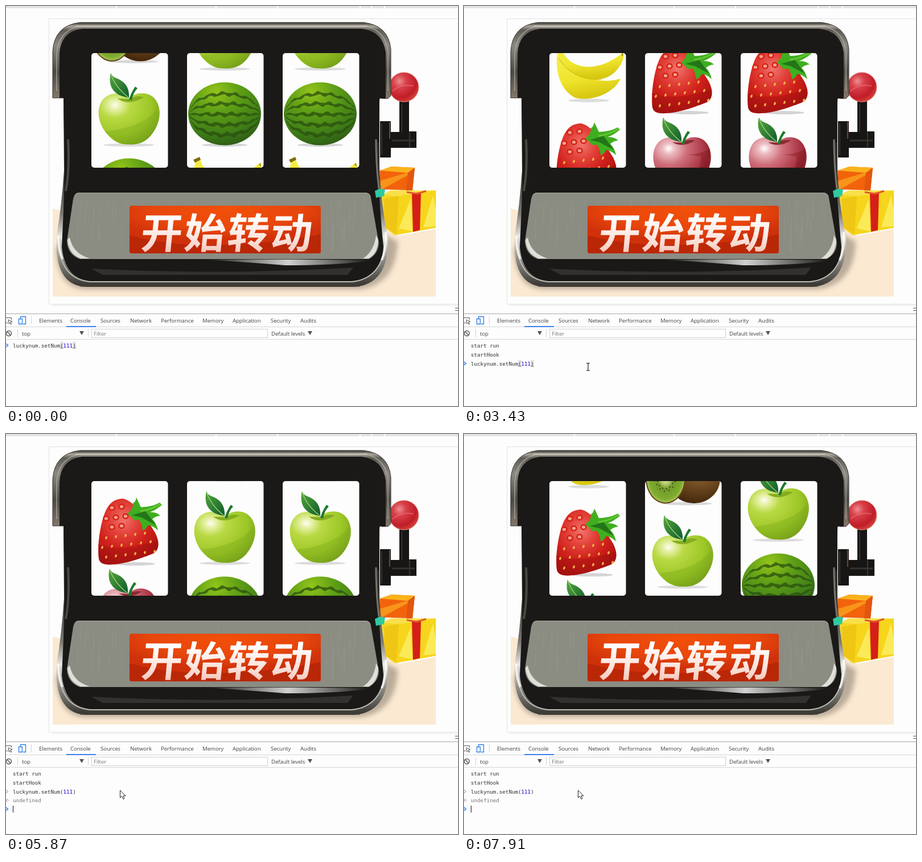
These frames come from a looping animation (794x705 px, 8 s). An HTML page:

```html
<!DOCTYPE html>
<html lang="zh">
<head>
<meta charset="utf-8">
<title>Slot machine</title>
<style>
html, body { margin: 0; width: 100%; height: 100%; overflow: hidden; background: #fdfdfd; }
svg { display: block; }
.ui { font: 9.7px "Open Sans", "Noto Sans", sans-serif; letter-spacing: -.1px; fill: #444; }
.mono { font: 9.2px "DejaVu Sans Mono", monospace; fill: #303030; white-space: pre; }
.num { fill: #1c00cf; }
.start { font: bold 73px "Noto Sans CJK SC", "Noto Sans CJK", sans-serif; letter-spacing: 3px; }
</style>
</head>
<body>
<svg id="stage" width="794" height="705" viewBox="0 0 794 705">
<defs>
  <linearGradient id="shell" x1="0" y1="0" x2="0" y2="1">
    <stop offset="0" stop-color="#3a3732"/><stop offset=".05" stop-color="#aaa69c"/>
    <stop offset=".1" stop-color="#5f5c55"/><stop offset=".3" stop-color="#8a8880"/>
    <stop offset=".65" stop-color="#4b4943"/><stop offset="1" stop-color="#85786b"/>
  </linearGradient>
  <linearGradient id="rim" x1="0" y1="0" x2="0" y2="1">
    <stop offset="0" stop-color="#2a2926"/><stop offset=".4" stop-color="#34332f"/>
    <stop offset=".62" stop-color="#7b7972"/><stop offset=".74" stop-color="#e9e8e3"/>
    <stop offset=".86" stop-color="#8d8b84"/><stop offset="1" stop-color="#35332f"/>
  </linearGradient>
  <linearGradient id="gloss">
    <stop offset="0" stop-color="#fff" stop-opacity="0"/><stop offset=".5" stop-color="#fff"/>
    <stop offset="1" stop-color="#fff" stop-opacity="0"/>
  </linearGradient>
  <radialGradient id="button" cx=".5" cy=".1" r=".62">
    <stop offset="0" stop-color="#f24f0a"/><stop offset=".62" stop-color="#e8470c"/>
    <stop offset="1" stop-color="#cf310a"/>
  </radialGradient>
  <linearGradient id="label" x1="0" y1="0" x2="0" y2="1">
    <stop offset=".3" stop-color="#fff"/><stop offset=".65" stop-color="#fbe3dc"/>
    <stop offset="1" stop-color="#f0b8a8"/>
  </linearGradient>
  <radialGradient id="green" cx=".27" cy=".23" r=".85">
    <stop offset="0" stop-color="#fdfdf0"/><stop offset=".12" stop-color="#e3efa0"/>
    <stop offset=".3" stop-color="#b9d944"/><stop offset=".7" stop-color="#9cc626"/>
    <stop offset="1" stop-color="#759f1a"/>
  </radialGradient>
  <radialGradient id="red" cx=".27" cy=".22" r=".88">
    <stop offset="0" stop-color="#fff"/><stop offset=".12" stop-color="#ecbcc2"/>
    <stop offset=".36" stop-color="#cf6f7b"/><stop offset=".66" stop-color="#b03c4a"/>
    <stop offset="1" stop-color="#76101a"/>
  </radialGradient>
  <radialGradient id="melon" cx=".38" cy=".15" r=".9">
    <stop offset="0" stop-color="#93c41a"/><stop offset=".35" stop-color="#5f9f16"/>
    <stop offset=".75" stop-color="#3f7d17"/><stop offset="1" stop-color="#2b5714"/>
  </radialGradient>
  <radialGradient id="berry" cx=".42" cy=".32" r=".75">
    <stop offset="0" stop-color="#f0766f"/><stop offset=".3" stop-color="#e2423a"/>
    <stop offset=".6" stop-color="#cf1f1a"/><stop offset="1" stop-color="#a81210"/>
  </radialGradient>
  <linearGradient id="banana" x1="0" y1="0" x2=".25" y2="1">
    <stop offset="0" stop-color="#f6ef50"/><stop offset=".6" stop-color="#efe42c"/>
    <stop offset="1" stop-color="#d8c812"/>
  </linearGradient>
  <radialGradient id="husk" cx=".6" cy=".2" r=".8">
    <stop offset="0" stop-color="#a37b43"/><stop offset=".5" stop-color="#765024"/>
    <stop offset="1" stop-color="#44280c"/>
  </radialGradient>
  <radialGradient id="pulp">
    <stop offset="0" stop-color="#dfe4a8"/><stop offset=".25" stop-color="#b4c96a"/>
    <stop offset=".42" stop-color="#6f9a2a"/><stop offset=".85" stop-color="#7fab2e"/>
    <stop offset="1" stop-color="#a3c452"/>
  </radialGradient>
  <radialGradient id="ball" cx=".35" cy=".3" r=".75">
    <stop offset="0" stop-color="#ec8d90"/><stop offset=".3" stop-color="#d8404a"/>
    <stop offset=".75" stop-color="#c01d28"/><stop offset="1" stop-color="#d4453c"/>
  </radialGradient>
  <linearGradient id="leafFill" x2="1" y2="1">
    <stop offset="0" stop-color="#55a83c"/><stop offset="1" stop-color="#0f5c2c"/>
  </linearGradient>
  <filter id="soft"><feGaussianBlur stdDeviation="4"/></filter>

  <g id="leaf">
    <path d="M34 1C31 14 32 27 43 36C50 42 59 43 66 45C67 30 62 20 50 13C42 9 36 8 34 1Z" fill="url(#leafFill)"/>
    <path d="M35 5Q43 27 65 44" fill="none" stroke="#a4d27a" stroke-width="1.3"/>
    <path d="M66 48Q70 35 77 25L81 28Q73 36 71 49Z" fill="#1f7a2a"/>
  </g>
  <path id="appleBody" d="M66 46C78 33 104 33 114 50C125 68 120 93 104 112C92 126 76 128 66 127C52 128 38 122 26 107C11 88 8 64 20 48C31 34 55 34 66 46Z"/>
  <g id="f0">
    <ellipse cx="66" cy="128" rx="45" ry="2.8" fill="#dcdcdc"/>
    <use href="#appleBody" fill="url(#green)"/>
    <path d="M46 46Q65 60 92 44Q80 39 67 47Z" fill="#84ad20"/>
    <path d="M116 64C100 88 62 100 24 104Q38 122 66 127C102 128 121 91 116 64Z" fill="#7aa51c" opacity=".35"/>
    <use href="#leaf"/>
  </g>
  <g id="f1">
    <ellipse cx="66" cy="128" rx="40" ry="3" fill="#d6d6d6"/>
    <ellipse cx="66" cy="73" rx="64" ry="55.5" fill="url(#melon)"/>
    <g id="stripes" fill="#2a4f10" opacity=".75"/>
  </g>
  <g id="f2">
    <ellipse cx="69" cy="109.500" rx="36" ry="3" fill="#dcdcdc"/>
    <path d="M13 29C11 62 20 92 46 105C76 112 114 96 125 71C102 78 64 80 27 35Z" fill="url(#banana)"/>
    <path d="M12 20L22 15L26 28C42 56 88 60 129 25Q132 33 127 43C119 58 108 69 90 72C56 74 30 58 17 36Z" fill="url(#banana)"/>
    <path d="M17 36C30 58 56 75 92 72" fill="none" stroke="#cfbf14" stroke-width="1.200"/>
    <path d="M11 20L22 15L24 20L14 25Z" fill="#7d6c14"/>
    <path d="M126 29L129 25L130 32Z" fill="#a8981a"/>
  </g>
  <g id="f3">
    <ellipse cx="76" cy="131" rx="36" ry="3" fill="#d4d4d4"/>
    <path d="M13 122C10 100 15 62 24 40C30 24 42 15 56 16C76 20 100 56 112 76C120 92 120 107 108 113C92 119 62 131 36 132C22 133 15 130 13 122Z" fill="url(#berry)"/>
    <path d="M12 96C45 110 88 100 117 88C120 106 112 112 92 119C72 126 50 132 36 132C22 133 15 130 13 122Z" fill="#8d0a0a" opacity=".3"/>
    <g id="seeds"/>
    <path d="M63 42Q74 35 73 24Q77 23 79 14L87 31Q105 31 120 23L124 27Q112 37 102 40Q114 39 121 46Q112 47 107 52Q115 60 117 72Q108 63 99 63Q96 71 90 72Q89 60 83 53Q74 56 72 50Z" fill="#3fae1e"/>
    <path d="M71 45L95 38L113 62Q96 54 88 49Z" fill="#22751a"/>
    <path d="M86 38Q104 36 122 25" fill="none" stroke="#65c436" stroke-width="3"/>
  </g>
  <g id="f4">
    <ellipse cx="66" cy="131.500" rx="43" ry="2.800" fill="#dcdcdc"/>
    <use href="#appleBody" fill="url(#red)" transform="translate(2.500 3.500) scale(.945 1)"/>
    <path d="M48 49Q66 60 88 46Q75 43 64 50Z" fill="#8a2a34"/>
    <path d="M64 70Q92 74 114 60Q114 104 82 130Q66 132 56 130Q100 112 98 74Z" fill="#6d0810" opacity=".3"/>
    <use href="#leaf" transform="translate(-2 4)"/>
  </g>
  <g id="f5">
    <ellipse cx="74" cy="115" rx="44" ry="2.800" fill="#d8d8d8"/>
    <ellipse cx="86" cy="71" rx="46" ry="43.500" fill="url(#husk)"/>
    <ellipse cx="36" cy="71" rx="35" ry="44" fill="#66451a"/>
    <ellipse cx="36" cy="71" rx="33" ry="42" fill="url(#pulp)"/>
    <g id="pips" fill="#2d2b0c"/>
  </g>
</defs>

<!-- page -->
<path d="M0 0H794V4H0Z" fill="#e4e4e4"/>
<path id="gaps" stroke="#fff" stroke-width="2"/>
<path d="M794 22.500H75.500V525.500H794" fill="none" stroke="#e3e3e3"/>
<path d="M80 527.500H794" stroke="#efefef" stroke-width="2"/>
<path d="M82 357L110 364H660L690 405L755 393V512H82Z" fill="#fbe9d2"/>
<path d="M88 425Q90 499 140 499H625Q686 488 688 415L660 400Z" fill="#7c6f60" opacity=".5" filter="url(#soft)"/>

<!-- gifts -->
<path d="M657 290L677 283L718 285L714 325L657 323Z" fill="#f2630c"/>
<path d="M657 290L677 283L718 285L706 294Z" fill="#fbb21c"/>
<path d="M657 308L704 294L708 297L662 322H657Z" fill="#f8941a"/>
<path d="M706 294L718 285L714 325H703Z" fill="#e2560f"/>
<path d="M660 333L676 325H755V391L683 404L665 390Z" fill="#f6d51c"/>
<path d="M660 333L676 325H755L690 335Z" fill="#f9e04a"/>
<path d="M664 340L690 335L686 402L665 390Z" fill="#efc614"/>
<path d="M690 392L711 340L714 397ZM733 390L750 334L755 360V388Z" fill="#fbea58"/>
<path d="M713 330L729 328L727 395L715 398Z" fill="#d51f18"/>
<path d="M704 328L722 331L738 326" fill="none" stroke="#e2572a" stroke-width="3"/>

<!-- lever -->
<path d="M691 165H708V221H721V250H676V267H657V203H676V222H691Z" fill="#171614"/>
<path d="M695 172V222M660 207V262" stroke="#34322e" stroke-width="2"/>
<path d="M674 204V234" stroke="#6b4638" stroke-width="2"/>
<path d="M678 237H718" stroke="#34322e" stroke-width="3"/>
<path d="M709 222V249" stroke="#39362f" stroke-width="2"/>
<circle cx="699" cy="143" r="26" fill="url(#ball)" stroke="#e59084"/>
<path d="M679 150Q694 136 716 141" fill="none" stroke="#e8747a" stroke-width="2" opacity=".6"/>

<!-- machine -->
<path d="M101 155L102 290Q98 350 89 405Q84 494 142 495H612Q673 490 671 410Q658 345 656 285V155Z" fill="url(#rim)"/>
<path d="M101 155L103 290L101 360L98 425Q104 482 150 485H606Q660 481 663 424Q655 345 651 240L657 155Z" fill="#1a1917"/>
<path d="M82 162V80Q85 34 130 29H628Q672 34 676 76V158L671 163H660V150H101V162Z" fill="url(#shell)" stroke="#35322d"/>
<path d="M94 162V84Q96 45 134 40H624Q662 44 667 82V163H655V240H103V162Z" fill="#1a1917"/>
<path d="M122 35.500H635" stroke="#cfcbc0" stroke-width="2"/>
<path d="M89 150V84Q92 46 124 37M671 150V82Q668 45 634 36" fill="none" stroke="#b5b2a9" stroke-width="2" opacity=".6"/>
<path d="M109 235Q112 290 105 326" fill="none" stroke="#4a4842" stroke-width="4"/>
<path d="M650 235Q650 280 655 322" fill="none" stroke="#77746c" stroke-width="3"/>
<path d="M94 410Q92 480 147 486H608Q662 480 666 415" fill="none" stroke="#bdbbb4" stroke-width="2"/>
<path d="M92 405Q92 430 99 446M667 398Q668 430 660 448" fill="none" stroke="#fff" stroke-width="4" opacity=".75"/>
<path d="M130 492H622" stroke="#3f3c37" stroke-width="5"/>
<path d="M150 463Q380 475 610 461L600 474H170Z" fill="#45423d" opacity=".6"/>
<path d="M350 447Q480 446 640 448Q600 457 490 457Q430 452 350 447Z" fill="url(#gloss)" opacity=".8"/>
<path d="M128 329H633Q640 330 641 338L655 418Q654 437 637 446H130Q108 438 107 414L118 340Q120 329 128 329Z" fill="#8b8c82"/>
<path id="grain" stroke="#a3a49a" opacity=".3"/>
<path d="M108 412Q110 437 131 445H147Q117 436 112 408ZM654 412Q653 437 637 445H627Q647 432 650 404Z" fill="#e0e0da"/>
<path d="M122 332Q124 329.500 130 329.500H631Q638 330 640 336" fill="none" stroke="#aeada3"/>
<path d="M648 326L656 322L666 323L664 335L650 338Z" fill="#2fc9a0"/>
<rect x="217" y="352" width="336" height="84" rx="4" fill="url(#button)"/>
<path d="M217 404Q290 424 385 421T553 402V432Q553 436 549 436H221Q217 436 217 432Z" fill="#ae2106" opacity=".6"/>
<text class="start" x="235" y="427" fill="url(#label)" transform="translate(41) skewX(-5.500)">开始转动</text>
<g id="reels"></g>

<!-- console -->
<path d="M0 542.500H794" stroke="#a8a8a8"/>
<path d="M0 565.500H794M0 587.500H794M44.500 547V561M20.500 570V584M144.500 570V584" stroke="#d4d4d4"/>
<path d="M789 532.500H794M789 536.500H794" stroke="#555"/>
<path d="M106 565H158" stroke="#3b82f0" stroke-width="2"/>
<path d="M0 549.500H9.500V553M0 558.500H3M4 553L11 556L8 557L10 560L8.500 561L7 558L5 560Z" fill="none" stroke="#555"/>
<path d="M25.500 551V547.500H34.500V560.500H30M22.500 551.500H28.500V560.500H22.500Z" fill="none" stroke="#2f7ee8" stroke-width="1.300"/>
<circle cx="5" cy="577" r="4.500" fill="none" stroke="#555" stroke-width="1.400"/><path d="M2 574L8 580" stroke="#555" stroke-width="1.400"/>
<rect x="150.500" y="569.500" width="309" height="15" fill="#fff" stroke="#cfcfcf"/>
<path d="M129 573H137L133 580ZM530 573H538L534 580Z" fill="#555"/>
<g id="tabs" class="ui"></g>
<g class="ui"><text x="28" y="580.500">top</text><text x="154" y="580.500" fill="#777">Filter</text><text x="466" y="580.500">Default levels</text></g>

<g id="logs" class="mono"><text x="12" y="601.500">start run</text><text x="12" y="617.500">startHook</text></g>
<g id="command" class="mono">
  <g id="brackets"><path d="M95 -6H101V5H95ZM117 -6H123V5H117Z" fill="#e4e4e4"/><path d="M95 5H101M117 5H123" stroke="#777"/></g>
  <text x="12" y="3.500">luckynum.setNum(<tspan class="num">111</tspan>)</text>
</g>
<g id="result" class="mono"><text x="12" y="649" fill="#777">undefined</text>
  <path d="M0 627L3.500 630L0 633M3 643L0 645.500L3 648" fill="none" stroke="#888"/><circle cx="4.500" cy="645.500" r=".7" fill="#888"/></g>
<path id="prompt" d="M0 -3L3.500 0L0 3" fill="none" stroke="#2f7ee8" stroke-width="1.500"/>
<path id="caret" d="M0 -6V6" stroke="#111"/>

<circle id="touch" r="8" fill="#3c3c3c" fill-opacity=".62"/>
<path id="beam" d="M-3 -6.500H-1L0 -5.500L1 -6.500H3M0 -5.500V5.500M-3 6.500H-1L0 5.500L1 6.500H3" fill="none" stroke="#222" stroke-width="1.200"/>
<path id="arrow" d="M-1.500 -1V12L1.500 9.500L4 14.500L6 13.500L3.800 8.800H8Z" fill="#fff" stroke="#222"/>
</svg>

<script>
const $ = id => document.getElementById(id);
const CELL = 134, LOOP = 8000, TURN = CELL * 6;
const SPIN = 2140, FOCUS = 4240, ENTER = 5700;

// Still parts built from short rules
let seed = 7;
const rand = () => (seed = seed * 16807 % 2147483647) / 2147483647;

$("gaps").setAttribute("d", [194, 369, 477, 622, 642, 665].map(x => `M${x} 0V4`).join(""));

$("grain").setAttribute("d", Array.from({ length: 90 }, () => {
  const x = 125 + rand() * 508 | 0, y = 334 + rand() * 60 | 0;
  return `M${x + .5} ${y}v${10 + rand() * 40 | 0}`;
}).join(""));

const tabs = { Elements: 58, Console: 113, Sources: 166, Network: 218, Performance: 272,
  Memory: 345, Application: 398, Security: 465, Audits: 517 };
$("tabs").innerHTML = Object.entries(tabs)
  .map(([name, x]) => `<text x="${x}" y="558">${name}</text>`).join("");

$("stripes").innerHTML = [-.66, -.34, 0, .34, .66].map((k, row) => {
  const upper = [], lower = [];
  for (let i = 0; i <= 28; i++) {
    const u = i / 14 - 1, bow = Math.sqrt(1 - u * u);
    const y = 74 + (k * 55 + 2 * Math.sin(i * 1.3 + row)) * bow;
    const half = (2.6 + Math.sin(i * 2.1 + row * 2) + row * .2) * bow;
    const x = 66 + u * 63;
    upper.push(`${x} ${y - half}`);
    lower.unshift(`${x} ${y + half}`);
  }
  return `<path d="M${upper.concat(lower).join("L")}Z"/>`;
}).join("");

let seeds = "";
for (let row = 0; row < 6; row++) {
  for (let col = 0; col < 6; col++) {
    const x = 19 + col * 17 + row % 2 * 7, y = 34 + row * 17 - col * 2;
    const left = 25 - row * 2.5, right = 60 + row * 13;
    if (x < left || x > right || y > 123 || (x > 66 && y < 70)) continue;
    seeds += row < 3
      ? `<ellipse cx="${x}" cy="${y}" rx="4.500" ry="4" fill="#f7a08e" stroke="#d5200f" stroke-width="2.500"/>`
      : `<ellipse cx="${x}" cy="${y}" rx="1.800" ry="2.800" fill="#f2b04a" transform="rotate(20 ${x} ${y})"/>`;
  }
}
$("seeds").innerHTML = seeds;

$("pips").innerHTML = Array.from({ length: 26 }, (_, i) => {
  const a = i * Math.PI / 13, r = .44 + i % 2 * .1;
  return `<circle cx="${36 + 32 * r * Math.cos(a)}" cy="${71 + 41 * r * Math.sin(a)}" r="1"/>`;
}).join("");

$("reels").innerHTML = [150, 318, 486].map((x, n) => `
  <clipPath id="window${n}"><rect x="${x}" y="83" width="134.500" height="202" rx="5"/></clipPath>
  <g clip-path="url(#window${n})"><path d="M${x} 83h135v202h-135Z" fill="#fdfdfd"/><g id="strip${n}">
  ${Array.from({ length: 8 }, (_, i) => `<use href="#f${i % 6}" y="${i * CELL}"/>`).join("")}
  </g></g>`).join("");

// The picture advances in held steps: first, last, count
const holds = [[0, 0, 1], [500, 1430, 8], [1550, 1550, 1], [2140, 3040, 8], [3190, 3430, 3],
  [3580, 4090, 5], [4240, 4510, 3], [4660, 5210, 5], [5330, 6260, 8], [6410, 7370, 8], [7490, 7910, 4]];
const steps = holds.flatMap(([a, b, n]) =>
  Array.from({ length: n }, (_, i) => n > 1 ? a + (b - a) * i / (n - 1) : a));
const held = t => steps.reduce((last, s) => s <= t + .01 ? s : last, 0);

function track(keys, t) {
  if (t <= keys[0][0]) return keys[0].slice(1);
  for (let i = 1; i < keys.length; i++) {
    const [a, ...p] = keys[i - 1], [b, ...q] = keys[i];
    if (t <= b) return p.map((v, j) => v + (q[j] - v) * (t - a) / (b - a));
  }
  return keys[keys.length - 1].slice(1);
}

const spin = [[2020, -17], [3430, -1149], [4510, -2037], [5210, -2588], [6410, -3561], [7910, -4765]];
const mouse = [[500, 596, 688], [700, 380, 655], [900, 260, 600], [1080, 163, 520], [1250, 250, 450],
  [1430, 350, 402], [1550, 356, 401], [2140, 356, 401], [2500, 330, 480], [2800, 262, 590],
  [3040, 225, 628], [3300, 218, 636], [3580, 218, 636], [4090, 202, 629]];

// Reels glide onto the strawberry one after another
const stops = [{ at: ENTER, end: -3501 }, { at: ENTER + 1500, end: -5109 }];
const GLIDE = 2250, RUN = 911;

function reelY(n, t) {
  const stop = stops[n];
  if (stop && t >= stop.at) {
    const left = Math.max(0, 1 - (t - stop.at) / GLIDE);
    return stop.end + RUN * left * left;
  }
  return track(spin, t)[0] + (n ? 0 : CELL);
}

const show = (id, on) => $(id).setAttribute("visibility", on ? "visible" : "hidden");
const move = (id, x, y) => $(id).setAttribute("transform", `translate(${x} ${y})`);

function draw(t) {
  [150, 318, 486].forEach((x, n) => {
    const y = ((reelY(n, t) - 83) % TURN + TURN) % TURN - TURN + 83;
    move("strip" + n, x, y);
  });

  const entered = t >= ENTER, line = t >= SPIN ? 630 : 598;
  const promptY = entered ? 661 : line;
  show("logs", t >= SPIN);
  show("brackets", !entered);
  show("result", entered);
  move("command", 0, line);
  move("prompt", 0, promptY);
  move("caret", entered ? 12.5 : 123.5, promptY);
  const since = t - (entered ? ENTER : FOCUS);
  show("caret", since >= 0 && Math.floor(since / 530) % 2 === 0);

  const [x, y] = track(mouse, t), seen = t >= 500;
  const inPage = y < 526, inPrompt = Math.abs(y - promptY) < 9;
  show("touch", seen && inPage);
  show("beam", seen && !inPage && inPrompt);
  show("arrow", seen && !inPage && !inPrompt);
  for (const id of ["touch", "beam", "arrow"]) move(id, x, y);
}

const begin = performance.now();
function tick() {
  draw(held((performance.now() - begin) % LOOP));
  requestAnimationFrame(tick);
}
tick();
</script>
</body>
</html>
```
